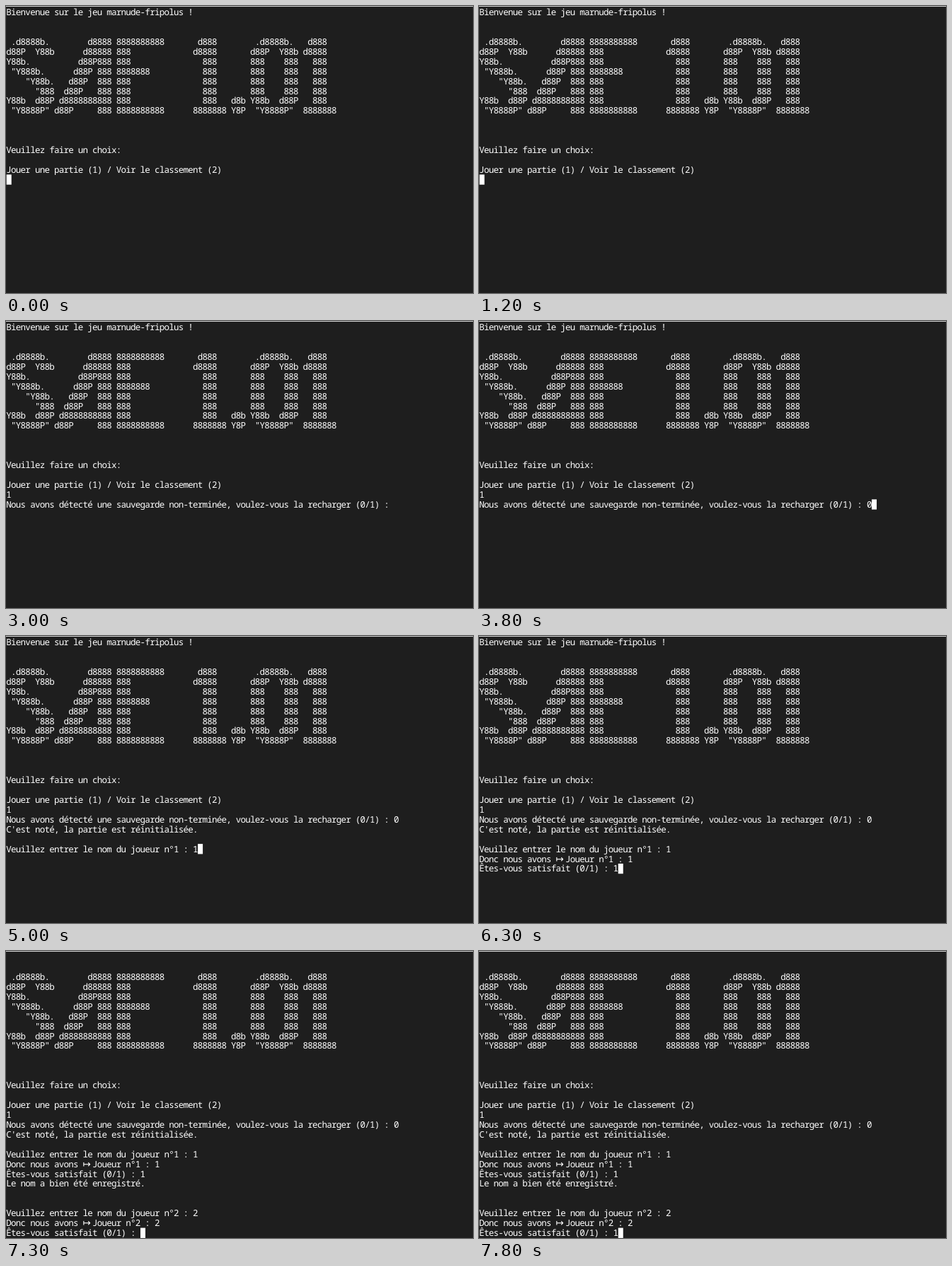
An HTML page that plays this animation: 660 by 406 pixels, repeating every 8000 ms.

```html
<!DOCTYPE html>
<html lang="fr">
<head>
<meta charset="utf-8">
<title>Terminal</title>
<style>
  html, body { margin: 0; width: 100%; height: 100%; overflow: hidden; background: #1e1e1e; }
  svg { display: block; width: 660px; height: 406px; }
  text {
    font: 12.5px "Noto Sans Mono", "DejaVu Sans Mono", monospace;
    fill: #fff;
    white-space: pre;
    text-rendering: geometricPrecision;
  }
  .arrow { font: 13.5px "DejaVu Sans", sans-serif; }
</style>
</head>
<body>
<svg viewBox="0 0 660 406">
  <rect width="660" height="406" fill="#1e1e1e"/>
  <rect width="660" height="1" fill="#d0d0d0"/>
  <g id="screen" xml:space="preserve"></g>
  <rect id="cursor" width="7" height="14.3" fill="#fff"/>
</svg>
<script>
const LOOP = 8000;
const ROWS = 29, COLS = 90;
const CELL = 6.76, PITCH = 13.93;
const LEFT = 0.7, TOP = 1.6;
const BASELINE = 11.5;
const GLYPH = 12.5 * 0.6;

const banner = String.raw`Bienvenue sur le jeu marnude-fripolus !


 .d8888b.        d8888 8888888888       d888        .d8888b.   d888
d88P  Y88b      d88888 888             d8888       d88P  Y88b d8888
Y88b.          d88P888 888               888       888    888   888
 "Y888b.      d88P 888 8888888           888       888    888   888
    "Y88b.   d88P  888 888               888       888    888   888
      "888  d88P   888 888               888       888    888   888
Y88b  d88P d8888888888 888               888   d8b Y88b  d88P   888
 "Y8888P" d88P     888 8888888888      8888888 Y8P  "Y8888P"  8888888



Veuillez faire un choix:

Jouer une partie (1) / Voir le classement (2)
`;

const askName = n => `Veuillez entrer le nom du joueur n°${n} : `;
const confirmName = n =>
  `\nDonc nous avons ↦ Joueur n°${n} : ${n}\nÊtes-vous satisfait (0/1) : `;

// [time, text appended to the terminal]
const output = [
  [0, banner],
  [1700, "1"],
  [2000, "\nNous avons détecté une sauvegarde non-terminée, voulez-vous la recharger (0/1) : "],
  [3800, "0"],
  [4200, "\nC'est noté, la partie est réinitialisée.\n\n" + askName(1)],
  [5000, "1"],
  [5600, confirmName(1)],
  [6300, "1"],
  [6600, "\nLe nom a bien été enregistré.\n\n\n" + askName(2)],
  [6900, "2"],
  [7300, confirmName(2)],
  [7800, "1"]
];

// Intervals in which the blinking cursor is hidden
const blinks = [[500, 1200], [2700, 3300]];

const SVG = "http://www.w3.org/2000/svg";
const screen = document.getElementById("screen");
const cursor = document.getElementById("cursor");

function set(node, attrs) {
  for (const name in attrs) node.setAttribute(name, attrs[name]);
  return node;
}

const columns = Array.from({ length: COLS },
  (_, i) => (LEFT + i * CELL + (CELL - GLYPH) / 2).toFixed(2)).join(" ");

const rows = Array.from({ length: ROWS }, (_, i) => {
  const row = document.createElementNS(SVG, "text");
  set(row, { x: columns, y: TOP + i * PITCH + BASELINE });
  return screen.appendChild(row);
});

let shown = null;

function showText(buffer) {
  if (buffer === shown) return;
  shown = buffer;
  const lines = buffer.split("\n").slice(-ROWS);
  rows.forEach((row, i) => {
    row.innerHTML = (lines[i] || "").replace("↦", '<tspan class="arrow">↦</tspan>');
  });
  const last = lines.length - 1;
  set(cursor, { x: LEFT + lines[last].length * CELL, y: TOP + last * PITCH });
}

function draw(t) {
  showText(output.filter(([at]) => at <= t).map(([, text]) => text).join(""));
  const hidden = blinks.some(([from, to]) => t >= from && t < to);
  set(cursor, { visibility: hidden ? "hidden" : "visible" });
}

const start = performance.now();

function tick() {
  draw((performance.now() - start) % LOOP);
  requestAnimationFrame(tick);
}

tick();
</script>
</body>
</html>
```
